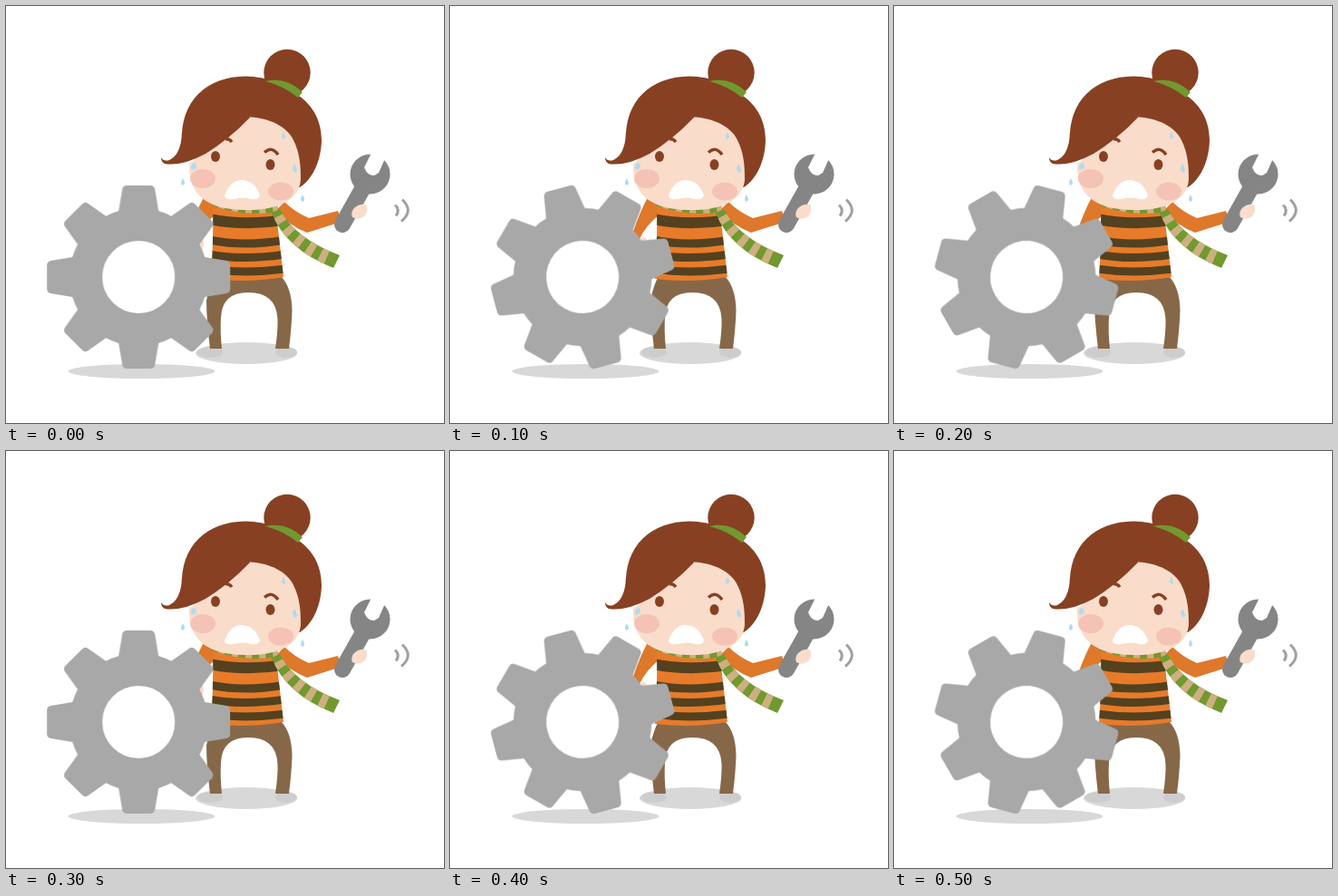
An HTML page without scripts that plays this animation: 483x460 px, repeating every 0.6 s.

```html
<!DOCTYPE html>
<html lang="en">
<head>
<meta charset="utf-8">
<title>Mechanic and gear</title>
<style>
  html, body { margin: 0; width: 100%; height: 100%; overflow: hidden; background: #fff; }
  svg { display: block; width: 100%; height: 100%; }
  .shadow { fill: #d8d8d8; }
  .skin { fill: #fadccb; }
  .hair { fill: #874122; }
  .knit { fill: #e77b2a; }
  .sleeve { fill: #de782b; }
  .blush { fill: #f5c3b5; }
  .drop { fill: #aedcee; }
  .scarf { fill: #71992f; }
  .bands { fill: none; stroke: #cdb07f; stroke-width: 22; }
  .gear { fill: #a8a8a8; animation: turn 300ms steps(3) infinite; }
  @keyframes turn { to { transform: rotate(-45deg); } }
</style>
</head>
<body>
<svg viewBox="0 0 483 460">
  <defs>
    <path id="torso" d="M228 220H297L306 299Q266 306 226 301Q229 262 228 220Z"/>
    <path id="neck" d="M229 214Q262 226 299 218L300 227Q262 233 227 220Z"/>
    <path id="tail" d="M302 224Q318 256 368 275L361 289Q308 268 293 228Z"/>
    <clipPath id="in-torso"><use href="#torso"/></clipPath>
    <clipPath id="in-neck"><use href="#neck"/></clipPath>
    <clipPath id="in-tail"><use href="#tail"/></clipPath>
    <path id="tooth" d="M-22.5 -70L-18 -97Q-17 -101 -13 -101H13Q17 -101 18 -97L22.5 -70Z"/>
    <g id="pair"><use href="#tooth"/><use href="#tooth" transform="rotate(180)"/></g>
    <g id="cross"><use href="#pair"/><use href="#pair" transform="rotate(90)"/></g>
    <path id="drop" d="M0 -4Q3 1 1.500 3Q0 4 -1.500 3Q-3 1 0 -4Z"/>
  </defs>

  <ellipse class="shadow" cx="149.500" cy="403" rx="81" ry="8"/>
  <ellipse class="shadow" cx="265" cy="383" rx="56" ry="12"/>
  <g fill="#cdcdcd">
    <ellipse cx="225" cy="382" rx="14" ry="6"/>
    <ellipse cx="309" cy="382" rx="12" ry="6"/>
  </g>

  <path fill="#866849" d="M230 298H303Q315 310 315.500 336Q315 354 312 378H297Q300 358 299.500 345Q298 316 267 316Q238 316 237 344Q236 358 238 378H225Q221 345 221 325Q224 309 230 298Z"/>

  <!-- torso and arms -->
  <ellipse class="skin" cx="213.500" cy="263" rx="4.500" ry="8"/>
  <path class="sleeve" d="M218 211Q209 228 202 249L209 257Q216 242 230 231V219Z"/>
  <use href="#torso" class="knit"/>
  <g clip-path="url(#in-torso)" fill="none" stroke="#54411f">
    <path stroke-width="12" d="M224 235Q262 243 308 236"/>
    <path stroke-width="9" d="M224 258Q262 266 308 258M224 274Q262 281 308 274M224 290Q262 296 308 290"/>
  </g>
  <path class="sleeve" d="M307 216Q318 227 334 234L366 226L370 238L332 250Q312 242 297 226Z"/>

  <!-- scarf -->
  <use href="#neck" class="scarf"/>
  <path class="bands" clip-path="url(#in-neck)" stroke-dasharray="7 8" stroke-dashoffset="-7" d="M228 217Q262 229 300 222"/>
  <use href="#tail" class="scarf"/>
  <path class="bands" clip-path="url(#in-tail)" stroke-dasharray="8" stroke-dashoffset="8" d="M361 281Q312 262 297 226"/>

  <!-- head -->
  <circle class="hair" cx="310" cy="73.500" r="25.700"/>
  <path class="hair" d="M194 150C192 104 222 78 264 77.500C290 78 306 87 320 97C340 110 348 128 348 149C347 172 338 191 324 200L240 190Z"/>
  <path class="scarf" d="M286 83Q309 78 327 95L322 101Q306 88 286 83Z"/>
  <path class="skin" d="M202 174L269 122.500C290 124 309 132 317 148C324 162 325 176 325 192C323 212 304 226 262 225C226 224 201 212 202 174Z"/>
  <g class="blush">
    <ellipse cx="217" cy="190.500" rx="14" ry="10.500"/>
    <ellipse cx="303" cy="204.500" rx="14" ry="10"/>
  </g>
  <g class="hair">
    <ellipse cx="231" cy="166" rx="5" ry="6"/>
    <ellipse cx="291.500" cy="175" rx="5" ry="6"/>
  </g>
  <path fill="none" stroke="#874122" stroke-width="3.500" d="M285 161.500Q293 154 300 164M242 147Q246 146 249 150"/>
  <path fill="#fff" d="M241 209Q247 192 260 192Q275 193 280 209Q279 214 271 213Q262 210 250 213Q241 214 241 209Z"/>
  <path class="hair" d="M220 110L269 123Q246 147 220 163Q194 177 175 174Q171 172 171 167Q174 172 180 170Q193 164 194 140Z"/>
  <g class="drop">
    <use href="#drop" x="208" y="176"/>
    <use href="#drop" x="206" y="177"/>
    <use href="#drop" x="195" y="194"/>
    <use href="#drop" x="306" y="143"/>
    <use href="#drop" x="318" y="178"/>
    <use href="#drop" x="319" y="180"/>
    <use href="#drop" x="327" y="212"/>
  </g>

  <!-- wrench -->
  <path stroke="#858585" stroke-width="18" stroke-linecap="round" d="M398 193L371 241"/>
  <circle fill="#858585" cx="401.500" cy="185.500" r="22"/>
  <path fill="#fff" d="M404 160L395 178Q398 187 406 187L411 184L419 166Z"/>
  <path class="skin" d="M383 224Q388 218 397 219Q400 226 395 232Q388 237 382 233Q380 229 383 224Z"/>
  <path fill="none" stroke="#a0a0a0" stroke-width="3" d="M429 219.500Q435 225 430 231.500M437 213.500Q450 226 436 237.500"/>

  <g transform="translate(146.200 299)">
    <g class="gear">
      <circle r="58" fill="none" stroke="#a8a8a8" stroke-width="36"/>
      <use href="#cross"/>
      <use href="#cross" transform="rotate(45)"/>
    </g>
  </g>
</svg>
</body>
</html>
```
